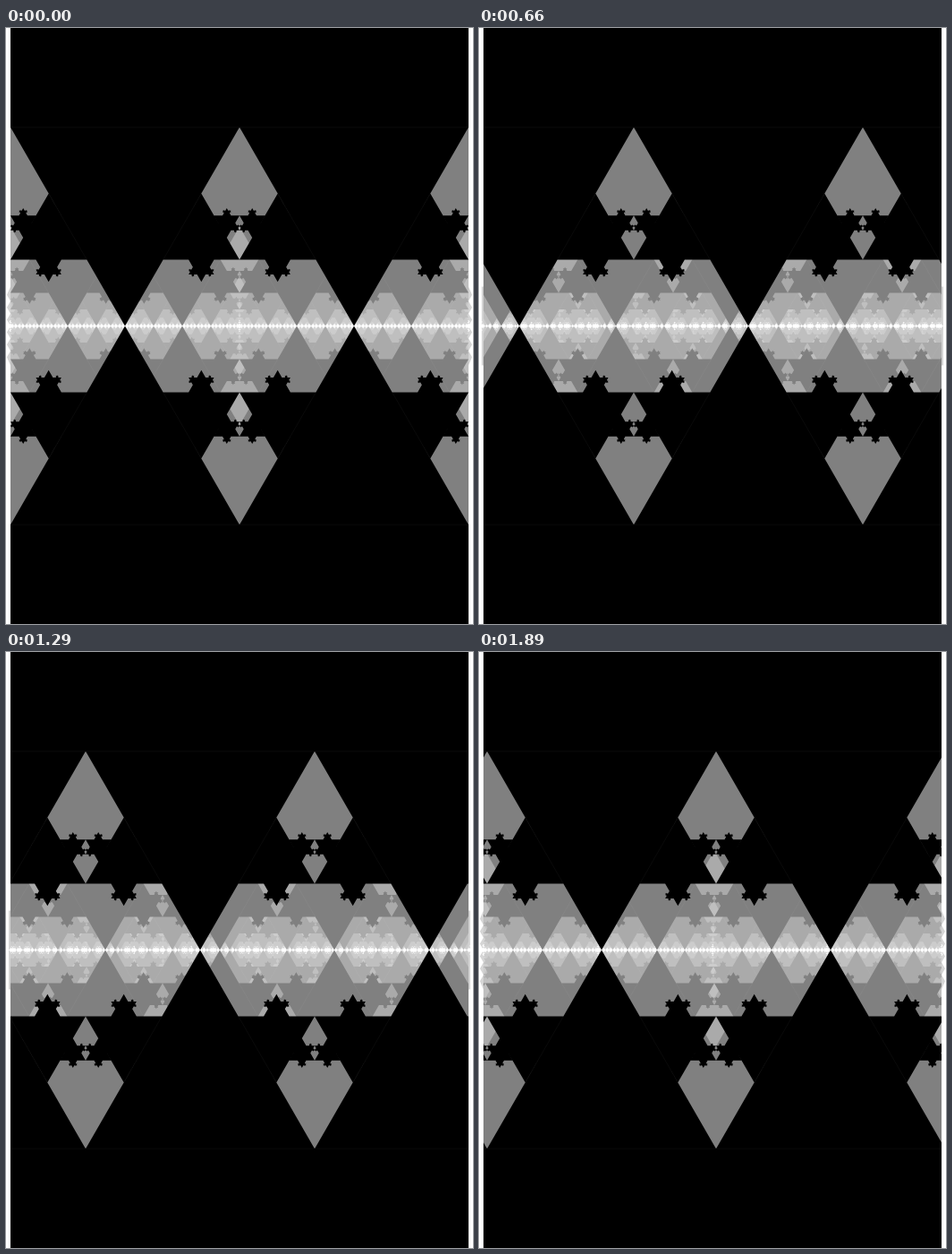
Animation of 522 by 665 pixels, one loop 1.92 s. Source, as an HTML page with a canvas:

```html
<!DOCTYPE html>
<html lang="en">
<head>
<meta charset="utf-8">
<title>Nested Koch bands</title>
<style>
html, body { margin: 0; width: 100%; height: 100%; overflow: hidden; background: #fff; }
canvas { display: block; }
</style>
</head>
<body>
<canvas id="stage" width="522" height="665"></canvas>
<script>
const W = 522, H = 665, CX = 261, CY = 332.5;
const SIDE = 256, RISE = SIDE * Math.sqrt(3) / 2;
const LAYERS = 6, STEPS = 64, STEP_MS = 30;
const LEFT = 5, RIGHT = 517;
const ctx = document.getElementById('stage').getContext('2d');

function triangle(path, a, b, c) {
  path.moveTo(...a);
  path.lineTo(...b);
  path.lineTo(...c);
  path.closePath();
}

// Triangle on the middle third of an edge, then on its two free sides.
function bump(path, a, b, depth) {
  if (!depth) return;
  const dx = (b[0] - a[0]) / 3, dy = (b[1] - a[1]) / 3, h = Math.sqrt(3) / 2;
  const p = [a[0] + dx, a[1] + dy];
  const q = [b[0] - dx, b[1] - dy];
  const tip = [(p[0] + q[0]) / 2 + dy * h, (p[1] + q[1]) / 2 - dx * h];
  triangle(path, p, tip, q);
  bump(path, p, tip, depth - 1);
  bump(path, tip, q, depth - 1);
}

function makeTile(depth) {
  const a = [-SIDE, -RISE], b = [0, -RISE], c = [-SIDE / 2, 0];
  const tile = new Path2D();
  triangle(tile, a, b, c);
  bump(tile, b, c, depth);
  bump(tile, c, a, depth);
  return tile;
}

const outline = makeTile(0);
const layers = Array.from({ length: LAYERS }, (_, k) => ({
  scale: 2 ** -k,
  shade: Math.round(255 * k / (k + 1)),
  tile: makeTile(Math.max(2, 5 - k)),
  seams: k < 3
}));

// The finest layer reaches past the sides with a toothed edge.
function fringe(path, scale, turn) {
  const row = RISE * scale, reach = 6 * row + row / 3;
  const depth = 2 * Math.cos(Math.PI * turn) ** 8;
  for (const [edge, dir] of [[LEFT, -1], [RIGHT, 1]]) {
    path.moveTo(edge, CY - reach);
    for (let i = -6; i <= 6; i++) {
      const y = i === -6 ? -reach : i === 6 ? reach : i * row;
      path.lineTo(edge + dir * (2 + (i % 2 ? depth : -depth)), CY + y);
    }
    path.lineTo(edge, CY + reach);
    path.closePath();
  }
}

function drawLayer(layer, shift, turn, finest) {
  const { scale, shade, tile, seams } = layer;
  const area = new Path2D();
  area.rect(LEFT, 0, RIGHT - LEFT, H);
  if (finest) fringe(area, scale, turn);
  ctx.save();
  ctx.clip(area);
  ctx.fillStyle = `rgb(${shade},${shade},${shade})`;
  ctx.strokeStyle = 'rgba(255,255,255,0.04)';
  ctx.lineWidth = 1 / scale;

  const top = CY - RISE * scale + 0.5;
  ctx.fillRect(0, 0, W, top);
  ctx.fillRect(0, H - top, W, top);

  const first = Math.floor((-CX / scale + shift) / SIDE) - 1;
  const last = Math.ceil((CX / scale + shift) / SIDE) + 2;
  for (const flip of [1, -1]) {
    for (let j = first; j <= last; j++) {
      ctx.setTransform(scale, 0, 0, scale * flip, CX + (j * SIDE - shift) * scale, CY);
      ctx.fill(tile);
      if (seams) ctx.stroke(outline);
    }
  }
  ctx.restore();
}

function draw() {
  const step = Math.floor(performance.now() / STEP_MS) % STEPS;
  const turn = step / STEPS;
  ctx.fillStyle = '#fff';
  ctx.fillRect(0, 0, W, H);
  for (let k = LAYERS - 1; k >= 0; k--) {
    drawLayer(layers[k], turn * SIDE, turn, k === LAYERS - 1);
  }
  requestAnimationFrame(draw);
}
draw();
</script>
</body>
</html>
```
